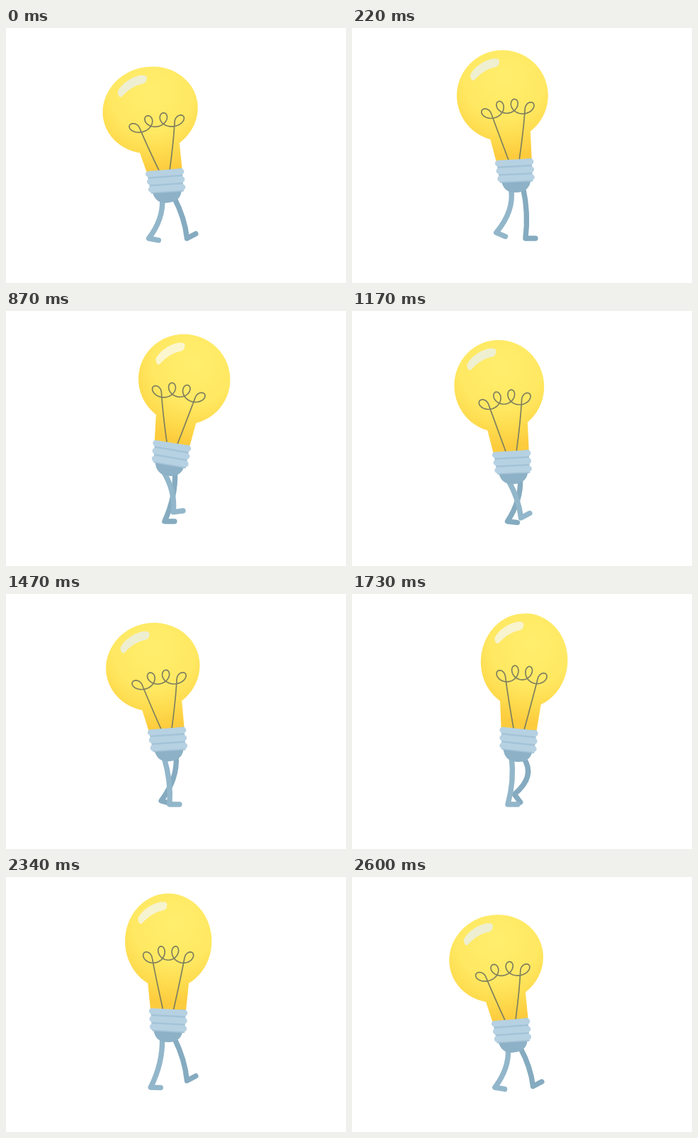
These frames come from a looping animation (480 by 360 pixels, 2.64 s). An HTML page with a canvas:

```html
<!DOCTYPE html>
<html lang="en">
<head>
<meta charset="utf-8">
<title>Walking light bulb</title>
<style>
  html, body { margin: 0; width: 100%; height: 100%; overflow: hidden; background: #fff; }
  canvas { display: block; width: 480px; height: 360px; }
</style>
</head>
<body>
<canvas id="stage" width="480" height="360"></canvas>
<script>
const ctx = document.getElementById('stage').getContext('2d');
const LOOP = 2640, STEPS = 61, TICK = LOOP / STEPS, SWAY = LOOP / 2, BOB = LOOP / 4;
const STANCE = 1400, GROUND = 297, FOOT = 14;

const wave = (t, period, shift = 0) => Math.cos(2 * Math.PI * (t + shift) / period);
const ease = u => {
  u = Math.max(0, Math.min(1, u));
  return u * u * (3 - 2 * u);
};

// Maps local points through a rotation and a shift
function placer(ox, oy, degrees) {
  const a = degrees * Math.PI / 180, c = Math.cos(a), s = Math.sin(a);
  return (x, y) => [ox + x * c - y * s, oy + x * s + y * c];
}

function stroke(color, width, trace) {
  ctx.strokeStyle = color;
  ctx.lineWidth = width;
  ctx.beginPath();
  trace();
  ctx.stroke();
}

function fill(color, trace) {
  ctx.fillStyle = color;
  ctx.beginPath();
  trace();
  ctx.fill();
}

// The planted foot slides back, then swings forward: toe down first, kicked up late
function gait(t) {
  if (t < STANCE) {
    const u = t / STANCE;
    return {
      x: 210 + 37 * (1 - u) ** 2,
      lift: 0,
      pitch: 12 * ease((t - 900) / 500) - 28 * (1 - ease(t / 150)),
      bend: 3 + 3 * u * u
    };
  }
  const v = (t - STANCE) / (LOOP - STANCE);
  const push = ease(v / 0.35), kick = ease((v - 0.53) / 0.15);
  return {
    x: 210 + 37 * ease(v / 0.75),
    lift: 16 * Math.sin(Math.PI * v ** 0.8),
    pitch: 12 + 48 * push - 88 * kick,
    bend: 6 + 7 * push - 10 * kick
  };
}

function drawLeg(t, side, base, color) {
  const { x, lift, pitch, bend } = gait(t % LOOP);
  const [hx, hy] = base(side, 41);
  const ankle = placer(x + side, GROUND - lift, pitch);
  const [ax, ay] = ankle(0, 0);
  stroke(color, 7.4, () => {
    ctx.moveTo(hx, hy);
    ctx.quadraticCurveTo((hx + ax) / 2 + 2 * bend, (hy + ay) / 2, ax, ay);
    ctx.lineTo(...ankle(FOOT, 0));
  });
}

function drawSocket(base) {
  fill('#8db1c6', () => {
    ctx.moveTo(...base(-21, 29));
    ctx.bezierCurveTo(...base(-19, 42), ...base(-12, 47), ...base(0, 47));
    ctx.bezierCurveTo(...base(12, 47), ...base(19, 42), ...base(21, 29));
  });
  fill('#a4c3d7', () => {
    ctx.moveTo(...base(-25, 1));
    ctx.lineTo(...base(25, 1));
    ctx.lineTo(...base(23, 34));
    ctx.lineTo(...base(-23, 31));
  });
  for (let i = 0; i < 3; i++) {
    const y = 4.5 + 11 * i, half = 23 - i * 0.5;
    stroke('#b6d1e2', 8.5, () => {
      ctx.moveTo(...base(-half, y - 1.3));
      ctx.lineTo(...base(half, y + 1.3));
    });
  }
}

function drawGlass(base, head, rx, ry, tilt) {
  const glow = ctx.createRadialGradient(...head(8, -25), 5, ...head(8, -25), 112);
  glow.addColorStop(0, '#ffee6c');
  glow.addColorStop(0.5, '#ffe862');
  glow.addColorStop(0.76, '#fedb4e');
  glow.addColorStop(1, '#fdcc3e');
  fill(glow, () => {
    ctx.moveTo(...base(-25, 2));
    ctx.lineTo(...head(-29, ry * 0.87));
    ctx.lineTo(...head(29, ry * 0.87));
    ctx.lineTo(...base(25, 2));
  });
  fill(glow, () => ctx.ellipse(...head(0, 0), rx, ry, tilt * Math.PI / 180, 0, 2 * Math.PI));
}

function drawShine(x, y, sway) {
  const mix = (a, b) => a + (b - a) * (sway + 1) / 2;
  fill(`rgb(${mix(238, 253)},${mix(238, 247)},${mix(210, 207)})`, () => {
    ctx.moveTo(x, y + 23);
    ctx.bezierCurveTo(x + 5, y + 13, x + 17, y + 3, x + 32, y);
    ctx.quadraticCurveTo(x + 43, y - 1, x + 41, y + 5);
    ctx.quadraticCurveTo(x + 41, y + 10, x + 36, y + 12);
    ctx.bezierCurveTo(x + 26, y + 13, x + 14, y + 21, x + 6, y + 30);
    ctx.quadraticCurveTo(x + 1, y + 33, x, y + 23);
  });
}

// Four cursive loops, the outer ones wider, between two wires
function drawFilament(base, coil) {
  const end = 1.68;
  const loop = p => {
    const turn = 2 * Math.PI * p;
    return coil(20 * p + (9 + 0.9 * p * p) * Math.sin(turn),
      19 + 4 * p * p + 10 * Math.cos(turn));
  };
  stroke('#80805f', 1.7, () => {
    ctx.moveTo(...base(-7.5, 1));
    ctx.quadraticCurveTo(...coil(-17.5, 55), ...loop(-end));
    for (let p = -end; p < end; p += 0.03) ctx.lineTo(...loop(p));
    ctx.lineTo(...loop(end));
    ctx.quadraticCurveTo(...coil(17.5, 55), ...base(7.5, 1));
  });
}

function draw(t) {
  const c = wave(t, SWAY, -28);
  const sway = -(1.5 * c - 0.5 * c ** 3);
  const bx = 231.5 - 8 * wave(t, SWAY, 37);
  const by = 192.5 + 8.5 * wave(t, BOB, 52);
  const rx = 64.5 + 3.4 * wave(t, BOB, -50);
  const ry = 128.5 - rx;
  const hx = bx + 20 * sway;
  const top = 38.8 + 16 * wave(t, BOB);
  const hy = top + ry;
  const tilt = 14 * sway;
  const base = placer(bx, by, 7.5 * sway);
  const head = placer(hx, hy, tilt);
  const turned = placer(hx - 5.5 * sway, hy - 3, 10 * sway);
  const coil = (x, y) => turned(x * rx / 62, y * ry / 66);

  ctx.clearRect(0, 0, 480, 360);
  ctx.lineCap = ctx.lineJoin = 'round';
  drawLeg(t, 8.5, base, '#85abc0');
  drawLeg(t + LOOP / 2, -8.5, base, '#92b6ca');
  drawGlass(base, head, rx, ry, tilt);
  drawShine(hx - 43 + 3 * sway, top + 12, sway);
  drawFilament(base, coil);
  drawSocket(base);
}

function frame() {
  const t = performance.now() % LOOP;
  draw(Math.min(STEPS - 1, Math.floor((t + 5) / TICK)) * TICK);
  requestAnimationFrame(frame);
}
frame();
</script>
</body>
</html>
```
